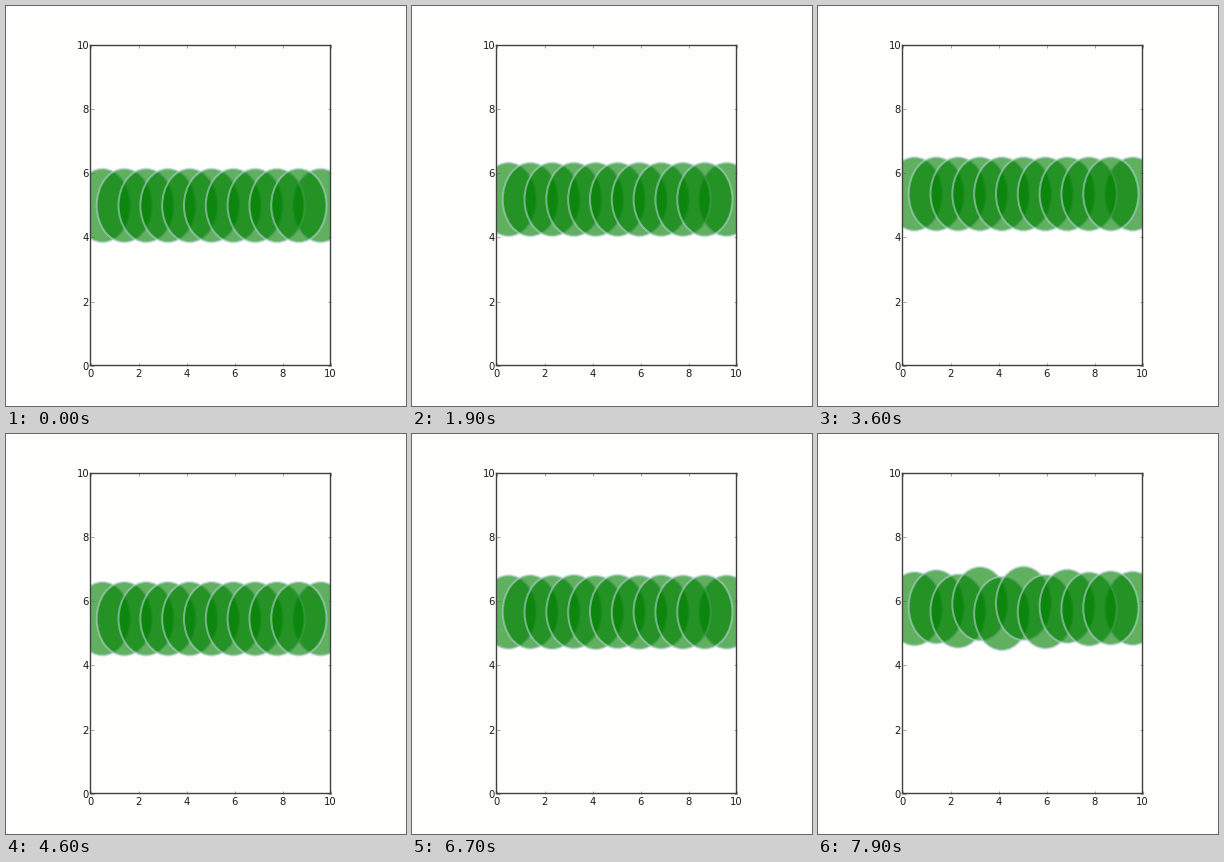
Recreate the animation shown at these times as a matplotlib script. Size 400 by 400 pixels, loop 8 s.

```python
import numpy as np
import matplotlib.pyplot as plt
from matplotlib.animation import FuncAnimation
from matplotlib.patches import Circle

SIZE, DPI = 400, 100
FRAMES, INTERVAL = 80, 100
COUNT, BOX = 11, 10
RADIUS = 1.15
DRIFT = 0.01          # units per frame
PX = 72 / DPI         # one pixel in points
PAPER = "#fefefc"

plt.rcParams["font.family"] = "DejaVu Sans"

fig = plt.figure(figsize=(SIZE / DPI, SIZE / DPI), dpi=DPI, facecolor=PAPER)
ax = fig.add_axes([84.5 / SIZE, 40.5 / SIZE, 240 / SIZE, 320 / SIZE],
                  facecolor=PAPER)
ax.set(xlim=(0, BOX), ylim=(0, BOX),
       xticks=range(0, BOX + 1, 2), yticks=range(0, BOX + 1, 2))
ax.tick_params(direction="in", top=True, right=True, length=3 * PX,
               width=0.6 * PX, color="0.4", labelsize=10 * PX,
               labelcolor="0.1")
ax.tick_params(axis="x", pad=3.5 * PX)
ax.tick_params(axis="y", pad=1.5 * PX)
for spine in ax.spines.values():
    spine.set(linewidth=1.4 * PX, edgecolor="0.25", snap=False)

index = np.arange(COUNT)
xs = 0.5 + index * BOX / COUNT
# zigzag buckling, strongest left of the middle
zigzag = -0.166 * (-1.0) ** index * np.exp(-((index - 4.2) / 2.8) ** 2)


def heights(n):
    return BOX / 2 + DRIFT * n + zigzag * np.exp(0.2 * (n - FRAMES + 1))


discs = [Circle((x, BOX / 2), RADIUS, facecolor=(0, 0.5, 0, 0.62),
                edgecolor=(0.7, 0.82, 0.83, 0.6), linewidth=2 * PX)
         for x in xs]
# the last disc lies beneath the others
for disc in discs[-1:] + discs[:-1]:
    ax.add_patch(disc)


def update(n):
    for disc, x, y in zip(discs, xs, heights(n)):
        disc.center = x, y
    return discs


anim = FuncAnimation(fig, update, frames=FRAMES, interval=INTERVAL,
                     repeat=True, repeat_delay=0, blit=False)
plt.show()
```
